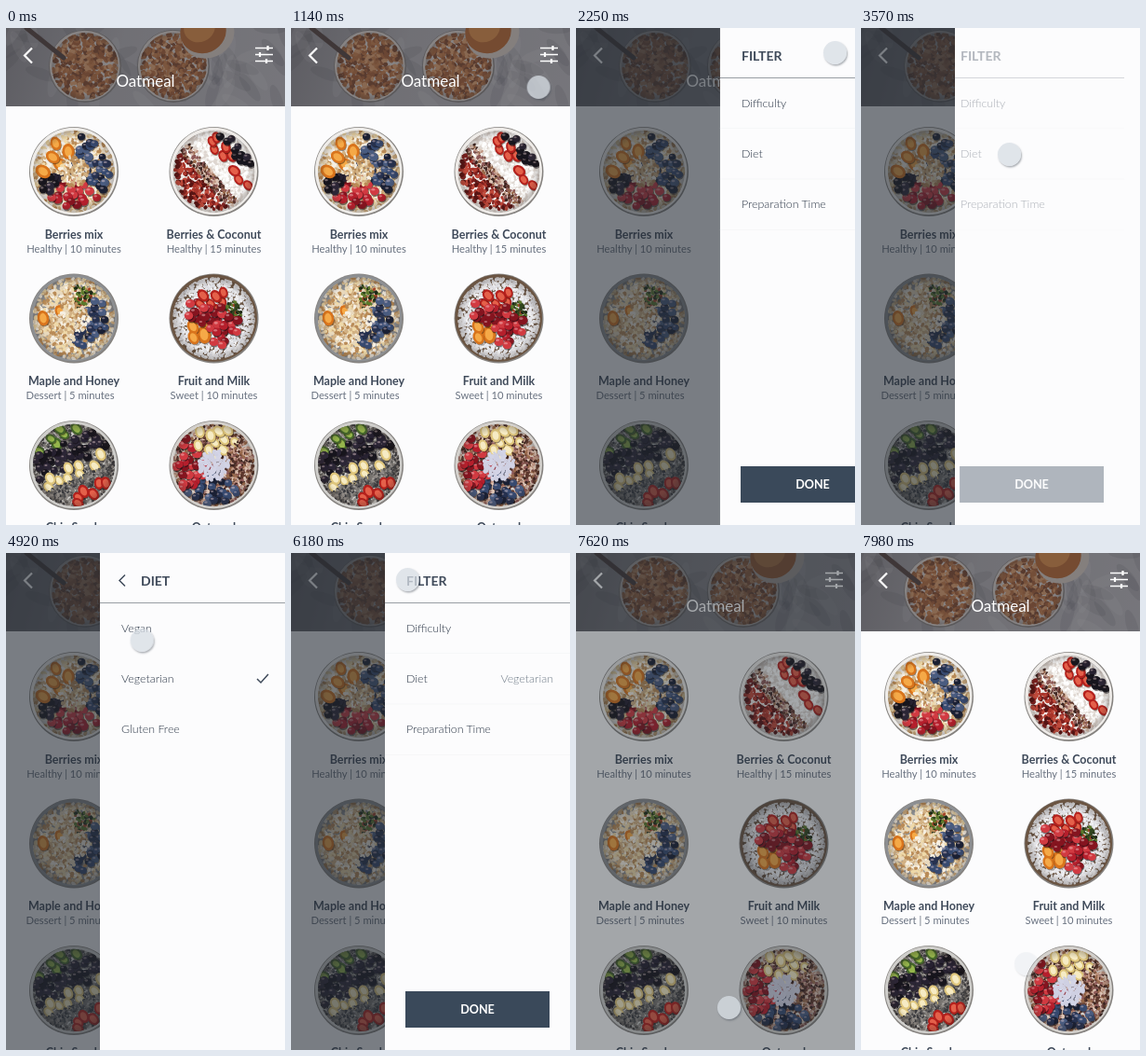
Animation of 300 by 533 pixels, one loop 8000 ms. Source, as an HTML page with a canvas:

```html
<!DOCTYPE html>
<html lang="en">
<head>
<meta charset="utf-8">
<title>Oatmeal recipes</title>
<style>
  html, body { margin: 0; width: 100%; height: 100%; overflow: hidden; background: #fcfcfd; }
  #stage { position: relative; width: 300px; height: 533px; overflow: hidden; }
  #stage > * { position: absolute; left: 0; top: 0; }
  canvas, svg { display: block; width: 300px; height: 533px; }
  text { font-family: Lato, "Open Sans", sans-serif; fill: #3f4a5a; }
  .mid { text-anchor: middle; }
  .name { font-size: 12.5px; font-weight: 700; }
  .info { font-size: 11.2px; fill: #697280; }
  .title { font-size: 17px; fill: #fff; }
  .head { font-size: 14px; font-weight: 700; }
  .row { font-size: 12.4px; font-weight: 300; fill: #2c3747; }
  .done { font-size: 12.6px; font-weight: 700; fill: #fff; }
  .pick { text-anchor: end; fill: #717d89; }
  .icon { fill: none; stroke: #fff; stroke-width: 1.5; }
  .bold { stroke-width: 2.2; }
  .dark { stroke: #3f4a5a; }
  .rule { stroke: #989da3; }
  .thin { stroke: #f6f7f8; }
  #shade { width: 300px; height: 533px; background: #242b32; opacity: 0; }
  #panel { width: 199px; height: 533px; margin-left: 101px; background: #fcfcfd; overflow: hidden; }
  #panel svg { width: 199px; }
  #touch { width: 25px; height: 25px; margin: -12.5px 0 0 -12.5px; }
  #dot { width: 100%; height: 100%; border-radius: 50%; background: rgba(214, 221, 227, .76);
         box-shadow: 1px 1.5px 2px rgba(70, 80, 90, .45); }
</style>
</head>
<body>
<div id="stage">
  <canvas id="photo"></canvas>
  <svg viewBox="0 0 300 533">
    <path class="icon bold" d="M28 21.5l-8 8 8 8"/>
    <path class="icon" d="M268 21.5h19m-19 7h19m-19 7h19"/>
    <path class="icon bold" d="M281.5 19v5M273 26v5M280 33v5"/>
    <text class="title mid" x="150" y="62.5">Oatmeal</text>
    <g id="labels"></g>
  </svg>
  <div id="shade"></div>
  <div id="panel">
    <svg viewBox="0 0 199 533">
      <g id="main">
        <text class="head" x="23" y="34.5">FILTER</text>
        <path class="rule" d="M0 53.5h199"/>
        <path class="thin" d="M0 107.5h199m-199 54.500h199m-199 54.500h199"/>
        <text class="row pick" id="choice" x="181" y="139">Vegetarian</text>
        <path d="M22 470h155v39H22z" fill="#3a495a"/>
        <text class="done mid" x="99.5" y="493.5">DONE</text>
      </g>
      <g id="diet">
        <path class="icon dark" d="M27 23.5l-6 6 6 6"/>
        <text class="head" x="44" y="34.5">DIET</text>
        <path class="rule" d="M0 53.5h199"/>
        <path class="icon dark" id="check" d="M169 135l4 4 8-9"/>
      </g>
    </svg>
  </div>
  <div id="touch"><div id="dot"></div></div>
</div>
<script>
const $ = id => document.getElementById(id);

function label(parent, text, x, y, kind) {
  const el = document.createElementNS('http://www.w3.org/2000/svg', 'text');
  el.setAttribute('class', kind);
  el.setAttribute('x', x);
  el.setAttribute('y', y);
  el.textContent = text;
  $(parent).append(el);
}
const rows = (id, ...names) => names.forEach((name, i) => label(id, name, 23, 85 + 54 * i, 'row'));
rows('main', 'Difficulty', 'Diet', 'Preparation Time');
rows('diet', 'Vegan', 'Vegetarian', 'Gluten Free');

const canvas = $('photo'), c = canvas.getContext('2d');
const ratio = window.devicePixelRatio || 1;
canvas.width = 300 * ratio;
canvas.height = 533 * ratio;
c.scale(ratio, ratio);

let seed = 7;
function rnd() {
  seed = (seed * 16807) % 2147483647;
  return seed / 2147483647;
}
const any = list => list[Math.floor(rnd() * list.length)];

function oval(x, y, rx, ry, fill, turn = 0) {
  c.beginPath();
  c.ellipse(x, y, rx, ry, turn, 0, 7);
  c.fillStyle = fill;
  c.fill();
}

// One piece of food at the origin
const shapes = {
  speck(r, colors) {
    oval(0, 0, r, r * (.5 + rnd() * .4), any(colors), rnd() * 3);
  },
  berry(r, colors) {
    oval(.6, 1, r, r, 'rgba(15,10,15,.5)');
    oval(0, 0, r, r * .9, any(colors));
    oval(-r * .3, -r * .35, r * .4, r * .25, 'rgba(255,225,225,.4)');
  },
  slice(r, colors) {
    const turn = .5 + rnd();
    oval(.6, 1, r, r * .75, 'rgba(30,15,0,.45)', turn);
    oval(0, 0, r, r * .75, colors[0], turn);
    oval(0, 0, r * .65, r * .45, colors[1], turn);
  }
};
const food = {
  oats: ['speck', 2.4, '#e8d8bc', '#d2b184', '#f6efe2', '#b98b57', '#efd9a8'],
  porridge: ['speck', 3, '#c67a45', '#a45a30', '#e0a06a', '#7f4527', '#b86c3a'],
  nuts: ['speck', 2, '#5d382d', '#98694b', '#c39a88', '#3c2420', '#dcc4b5', '#8e5a58'],
  coconut: ['speck', 2, '#ffffff', '#f3f0ec', '#ded6d0'],
  milk: ['speck', 2, '#e6e6ea', '#dcdde2', '#f0f0f2'],
  cream: ['speck', 3, '#cfd0e2', '#d3d4e6'],
  goji: ['speck', 2.6, '#81201e', '#a9342a', '#581413', '#bf493a'],
  seeds: ['speck', 1.6, '#5d5b59', '#77736f', '#38383c', '#908b86'],
  herbs: ['speck', 2.2, '#31451e', '#5d7a2c', '#1e2916', '#a5452a'],
  blueberry: ['berry', 4.3, '#26314f', '#374a70', '#1a2034', '#4a5c80'],
  blackberry: ['berry', 4.3, '#17151d', '#262130', '#2c2636'],
  raspberry: ['berry', 4.7, '#b51f2c', '#d13a41', '#85141f'],
  strawberry: ['slice', 6.5, '#b5201c', '#e4604a'],
  orange: ['slice', 8.5, '#d9741c', '#f5a947'],
  banana: ['slice', 6.5, '#dfc67c', '#f6ebc4'],
  kiwi: ['slice', 7, '#44662a', '#95b54c']
};

// Cover a disc with one food, wherever inside(x, y) holds
function cover(name, radius, inside = () => true) {
  const [shape, size, ...colors] = food[name];
  const count = (radius / size) ** 2 * (shape === 'speck' ? 2.2 : 1.15);
  for (let i = 0; i < count; i++) {
    const d = radius * Math.sqrt((i + rnd()) / count), a = i * 2.4 + rnd() * .3;
    const x = d * Math.cos(a), y = d * Math.sin(a);
    if (!inside(x, y)) continue;
    c.save();
    c.translate(x, y);
    shapes[shape](size * (.85 + rnd() * .3), colors);
    c.restore();
  }
}

// Zones: parallel stripes along a direction, or sectors clockwise from the top
const stripes = turn => (x, y, r, n) =>
  Math.floor(((x * Math.cos(turn) + y * Math.sin(turn)) / r + 1) / 2 * n);
const sectors = (x, y, r, n) =>
  Math.floor((Math.atan2(x, -y) / (2 * Math.PI) + 1) % 1 * n);

function dish(x, y, r, { rim, base, layout, foods = '', core, fill = .88 }) {
  const names = foods.split(' ').filter(Boolean), inner = r * .92;
  c.save();
  c.translate(x, y);
  oval(0, 0, r, r, '#85827f');
  oval(-.3, -.5, r - 1.2, r - 1.2, rim);
  c.beginPath();
  c.arc(0, 0, inner, 0, 7);
  c.clip();
  cover(base, inner);
  names.forEach((name, i) => cover(name, inner * fill,
    (px, py) => layout(px, py, inner * fill, names.length) === i));
  if (core) cover(core, inner * .36);
  const edge = c.createRadialGradient(0, 0, inner * .8, 0, 0, inner);
  edge.addColorStop(0, 'rgba(40,30,25,0)');
  edge.addColorStop(1, 'rgba(40,30,25,.28)');
  oval(0, 0, inner, inner, edge);
  c.restore();
}

const recipes = [
  { name: 'Berries mix', info: 'Healthy | 10 minutes', rim: '#eeece9', base: 'oats', layout: sectors,
    foods: 'blueberry blueberry blueberry raspberry raspberry blackberry orange orange', core: 'oats' },
  { name: 'Berries & Coconut', info: 'Healthy | 15 minutes', rim: '#eeebe8', base: 'coconut', layout: stripes(-.7),
    foods: 'goji goji nuts coconut strawberry blackberry', fill: .94 },
  { name: 'Maple and Honey', info: 'Dessert | 5 minutes', shift: -4, rim: '#8d8f92', base: 'oats', layout: sectors,
    foods: 'herbs blueberry blueberry blueberry oats oats orange oats', core: 'oats', fill: .8 },
  { name: 'Fruit and Milk', info: 'Sweet | 10 minutes', rim: '#6b5543', base: 'milk', layout: sectors,
    foods: 'strawberry herbs raspberry raspberry orange orange raspberry strawberry', core: 'raspberry', fill: .68 },
  { name: 'Chia Seeds', rim: '#cfcecb', base: 'seeds', layout: stripes(1.15),
    foods: 'kiwi blackberry blackberry banana seeds strawberry', fill: .95 },
  { name: 'Oatmeal', rim: '#d3d0cc', base: 'nuts', layout: sectors,
    foods: 'banana nuts nuts blueberry blueberry raspberry raspberry banana', core: 'cream', fill: .95 }
];
recipes.forEach((recipe, i) => {
  const x = 73 + 150.5 * (i % 2), row = i >> 1;
  dish(x, 154 + 157.5 * row, 48, recipe);
  label('labels', recipe.name, x, 225.5 + 157 * row, 'name mid');
  if (recipe.info) label('labels', recipe.info, x + (recipe.shift || 0), 241.3 + 157 * row, 'info mid');
});

// Header: two bowls of porridge and a honey jar on marble
c.beginPath();
c.rect(0, 0, 300, 84);
c.clip();
const marble = c.createLinearGradient(0, 0, 300, 84);
marble.addColorStop(0, '#8a898e');
marble.addColorStop(.4, '#b0afb3');
marble.addColorStop(1, '#bcbbc0');
c.fillStyle = marble;
c.fillRect(0, 0, 300, 84);
for (let i = 0; i < 50; i++) {
  oval(rnd() * 300, rnd() * 84, 18, 6, any(['rgba(255,255,255,.12)', 'rgba(60,60,70,.12)']), rnd() * 3);
}
for (const x of [85, 180]) dish(x, 41, 39, { rim: '#dcd5d0', base: 'porridge' });
c.lineWidth = 5;
c.lineCap = 'round';
c.strokeStyle = '#4d3d38';
c.beginPath();
c.moveTo(22, 0);
c.lineTo(62, 32);
c.stroke();
oval(217, 7, 29, 25, '#d8cdc4', -.4);
oval(212, 4, 25, 23, '#b9642a', -.4);
oval(208, 0, 17, 15, '#e08c40', -.4);
c.fillStyle = 'rgba(50,50,56,.5)';
c.fillRect(0, 0, 300, 84);

// Motion: steps of [ms, value, easing to the next step]
const LOOP = 8000, start = document.timeline.currentTime;
const soft = 'ease-in-out', jump = 'step-end';
function play(id, prop, steps, format = v => v) {
  const frames = steps.map(([t, v, easing = 'linear']) =>
    ({ offset: t / LOOP, [prop]: format(v), easing }));
  frames.unshift({ ...frames[0], offset: 0, easing: 'linear' });
  frames.push({ ...frames[frames.length - 1], offset: 1 });
  $(id).animate(frames, { duration: LOOP, iterations: Infinity }).startTime = start;
}
const fade = (id, ...steps) => play(id, 'opacity', steps);
const slide = (id, ...steps) => play(id, 'transform', steps, x => `translateX(${x}px)`);

fade('shade', [1830, 0], [1890, .1], [2220, .6], [7470, .6], [7950, 0]);
slide('panel', [2040, 199, soft], [2370, 0], [7470, 0, 'ease-in'], [7610, 199]);

fade('main', [3450, 1], [3650, 0], [5750, 0], [6050, 1]);
slide('main', [3450, 0], [3650, -28, jump], [5750, -28, 'ease-out'], [6050, 0]);
fade('diet', [3620, 0], [3900, 1], [5580, 1], [5780, 0]);
slide('diet', [3620, 28, 'ease-out'], [3900, 0], [5580, 0], [5780, 28]);
fade('check', [4500, 0], [4620, 1]);
fade('choice', [0, 0, jump], [5500, 1]);

const icon = [278, 26], diet = [159, 135], back = [125, 28], done = [164, 487];
play('touch', 'transform', [
  [600, [215, 215], soft], [1380, icon], [2610, icon, soft], [3300, diet],
  [4650, diet, soft], [5270, back], [6360, back, soft], [7140, done],
  [7620, done, soft], [7980, [177, 440]]
], ([x, y]) => `translate(${x}px, ${y}px)`);
fade('touch', [600, 0], [780, 1], [7640, 1], [7980, .4], [7999, 0]);

const taps = [1440, 3310, 4430, 5280, 7160];
play('dot', 'transform', taps.flatMap(t => [[t, 1, soft], [t + 70, .84, soft], [t + 140, 1]]),
  s => `scale(${s})`);
</script>
</body>
</html>
```
